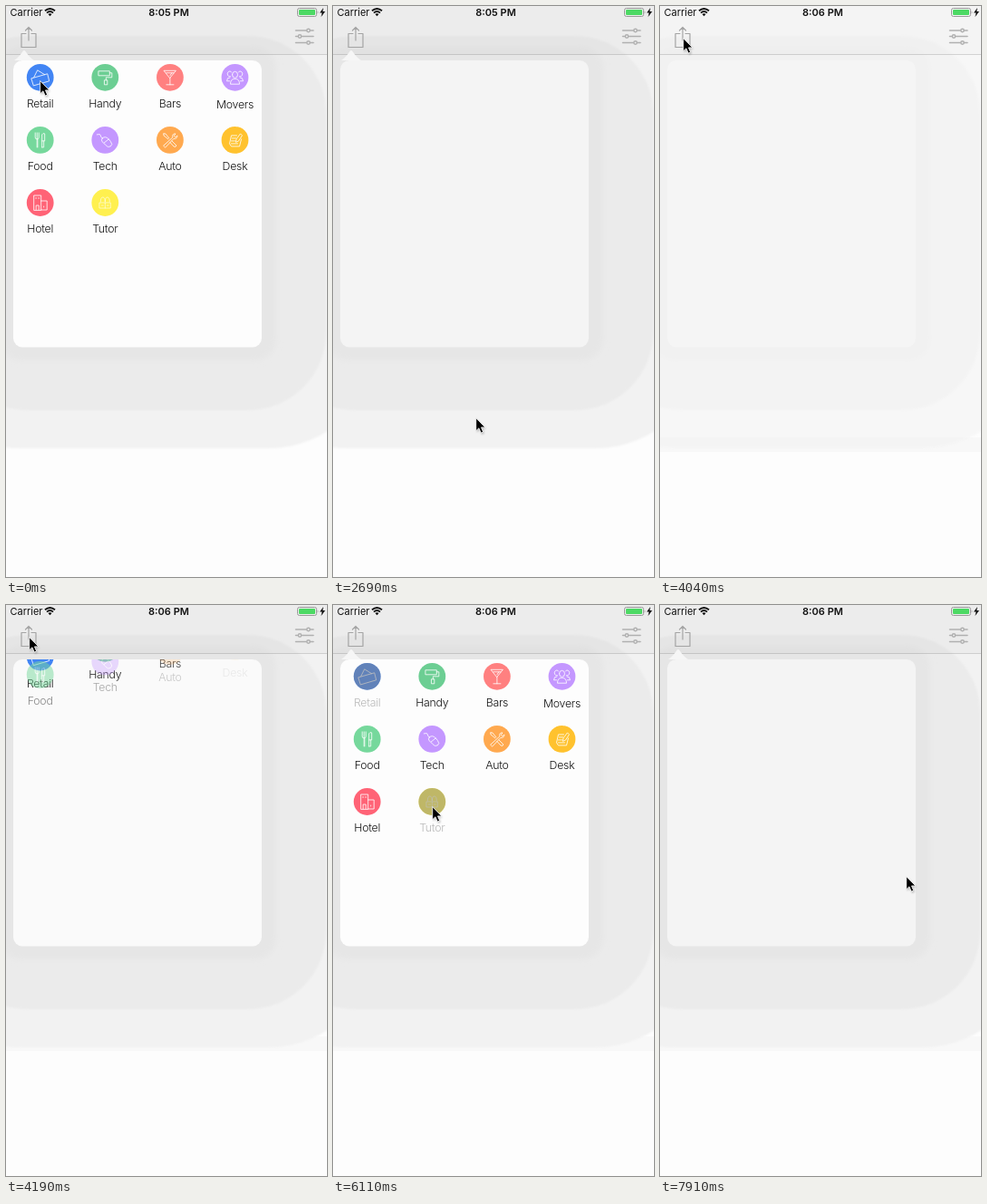
These frames come from a looping animation (354x630 px, 8000 ms). An HTML page:

```html
<!DOCTYPE html>
<html lang="en">
<head>
<meta charset="utf-8">
<title>Category popover</title>
<style>
  html, body { margin: 0; height: 100%; overflow: hidden; background: #fdfdfd; }
  svg { display: block; width: 100vw; height: 100vh; }
  .status { font: 11px Inter, sans-serif; fill: #111; }
  .label { font: 300 12.3px Inter, "Liberation Sans", sans-serif; letter-spacing: -.25px; text-anchor: middle; }
  .line { fill: none; stroke-linejoin: round; stroke-linecap: round; }
  #clock { font-weight: 600; text-anchor: middle; }
</style>
</head>
<body>
<svg viewBox="0 0 354 630">
  <defs>
    <clipPath id="inside"><rect x="8" y="60" width="274" height="316.500" rx="10"/></clipPath>
    <filter id="soft"><feGaussianBlur stdDeviation="1"/></filter>
    <filter id="softer"><feGaussianBlur stdDeviation="3"/></filter>
  </defs>
  <rect width="354" height="630" fill="#fdfdfd"/>
  <rect id="band" y="476" width="354" height="13" fill="#f8f8f8"/>

  <g id="shadow">
    <rect x="-104" y="-140" width="514" height="628" rx="120" fill="#f2f2f2" filter="url(#soft)"/>
    <rect x="-62" y="33" width="415" height="413" rx="86" fill="#ebebeb" filter="url(#soft)"/>
    <rect x="-8" y="44" width="306" height="347" rx="24" fill="#e6e6e6" filter="url(#softer)"/>
    <rect width="354" height="53" opacity=".025"/>
  </g>

  <path d="M0 53.500H354" stroke="#000" stroke-opacity=".15"/>
  <g class="line" stroke="#a4a4a4" stroke-width="1.200">
    <path d="M22 30.500H17V45.500H33V30.500H28M25 38V23.500M21.500 27L25 23.500L28.500 27"/>
    <g stroke="#b0b0b0" stroke-width="1.500">
      <path d="M319.500 27H339M319.500 33.500H339M319.500 40.500H339"/>
      <g fill="#f0f0f0"><circle cx="333.500" cy="27" r="1.700"/><circle cx="324" cy="33.500" r="1.700"/><circle cx="333.500" cy="40.500" r="1.700"/></g>
    </g>
  </g>
  <text class="status" x="4.500" y="11">Carrier</text>
  <text class="status" id="clock" x="179.500" y="11">8:05 PM</text>
  <g fill="none" stroke="#111" stroke-width="1.900">
    <path d="M43 5.300Q48.500 .500 54 5.300M45 7.600Q48.500 4.600 52 7.600"/>
    <path d="M46.500 9L48.500 11.200L50.500 9Q48.500 7.600 46.500 9Z" fill="#111" stroke="none"/>
  </g>
  <rect x="321.500" y="2.500" width="21" height="9" rx="2" fill="none" stroke="#999"/>
  <rect x="323" y="4" width="18" height="6" rx="1" fill="#4cd964"/>
  <path d="M343.700 5.500Q345.500 7 343.700 8.500Z" fill="#999"/>
  <path d="M350 2L346 7.500H348.500L347.500 12L352 6H349.300Z" fill="#111"/>

  <g id="popover">
    <path id="arrow" d="M9 60Q14 57 18.500 50Q20 48 21.500 50Q26 57 31 60Z" fill="#f6f6f6"/>
    <rect x="8" y="60" width="274" height="316.500" rx="10"/>
  </g>
  <g id="items" clip-path="url(#inside)"></g>
  <g id="cursor">
    <g transform="translate(.7 .5) scale(.92)">
      <path d="M1 2V17.500L4.500 14L7 20L10 18.500L7.500 13H12Z" opacity=".25" filter="url(#soft)"/>
      <path d="M0 0V15.500L3.500 12.300L6 18L8.600 16.900L6.300 11.300H11Z" stroke="#fff" stroke-width=".9"/>
    </g>
  </g>
</svg>
<script>
const LOOP = 8000;
const $ = id => document.getElementById(id);

// name, circle colour, line drawing around the circle's centre
const ITEMS = [
  ["Retail", "#4285f4", "M-9.500 1L8 -4L10 4L-7 9ZM-7 0L-3 -8L5 -3"],
  ["Handy", "#6cce93", "M-7 -7H5V-2H-7ZM5 -5H7.500V0H1V3M-.500 3H2.500V8H-.500Z"],
  ["Bars", "#ff8080", "M-6.500 -7.500H6.500L0 .500ZM0 .500V8M-4 8H4M-4 -5H4M0 -2L2 -5"],
  ["Movers", "#c497ff", "M-3 -3a3 3.500 0 1 0 6 0a3 3.500 0 1 0 -6 0M-5 7Q-5 1.500 0 1.500T5 7ZM-4 -6A2.500 3 0 1 0 -5 -1M4 -6A2.500 3 0 1 1 5 -1M-6 4H-9Q-9 0 -5.500 0M6 4H9Q9 0 5.500 0"],
  ["Food", "#76d89c", "M-5.500 -8V-3Q-5.500 -1 -3.500 -1T-1.500 -3V-8M-3.500 -8V8M-2.800 -1V8M2 8V-6Q3 -8 5 -7V1H2M4 1V8H2"],
  ["Tech", "#c497ff", "M-3 -2Q0 -5 4 -1L6 1.500Q9 5 6 7T0 5L-3 2Q-5 0 -3 -2ZM-1 3L4 -1M-3 -2Q-5 -3 -5 -5T-9 -6"],
  ["Auto", "#ffa94f", "M-7 -7L-5 -7L-1 -2M2 1L7 6L6 7.500L4 7L0 2.500M-7 6L3 -3Q2 -7 6 -7L4.500 -4.500L6 -3L8 -5Q8 -1 4 -1.500L-5 8ZM-7 -7V-5L-2 -1"],
  ["Desk", "#ffc22e", "M2 -5H-4L-6 4L-4 7H5L7 -1M-3 -2H1M-4 1H0M-4 4H3M1 2L1.500 -1L6 -7L8 -5L4 1Z"],
  ["Hotel", "#ff6376", "M-7 8V-8H1V8ZM1 -2H7.500V8H1M-5 -5H-4M-2 -5H-1M-4.500 8V3H-1.500V8M4 4V5"],
  ["Tutor", "#fff04f", "M-5 -1Q-5 -6 -2.500 -6T0 -1Q0 -6 2.500 -6T5 -1M-6 0H6V6H-6ZM0 0V6M-4 3H-2M2 3H4"]
];

const parts = ITEMS.map(([name, color, art], i) => {
  const x = 37.7 + (i % 4) * 71.6, y = 78.8 + Math.floor(i / 4) * 69.1;
  $("items").insertAdjacentHTML("beforeend",
    `<g><g transform="translate(${x} ${y})"><circle r="14.900" fill="${color}"/>
     <path class="line" d="${art}" stroke="#fff" stroke-width=".9" stroke-opacity="${name === "Tutor" ? .65 : .9}"/>
     <circle r="14.900" fill="#808080" opacity="0"/></g>
     <text class="label" x="${x}" y="${y + (name === "Movers" ? 34 : 33)}">${name}</text></g>`);
  const g = $("items").lastElementChild;
  return { g, veil: g.querySelectorAll("circle")[1], label: g.querySelector("text") };
});

// time, x, y of the pointer tip
const POINTER = [
  [0, 37, 82], [140, 50, 125], [290, 92, 245], [440, 108, 281],
  [890, 108, 281], [1040, 120, 330], [1190, 153, 420], [1340, 169, 452], [1490, 157, 456],
  [2690, 157, 454], [2840, 137, 290], [2990, 102, 120], [3140, 68, 72], [3290, 42, 48],
  [3590, 26, 36], [3740, 25, 35], [4340, 25, 35], [4640, 29, 77], [4940, 35, 81],
  [5390, 35, 81], [5540, 54, 120], [5840, 106, 215], [5960, 109, 222],
  [6410, 109, 222], [6860, 121, 296], [7310, 121, 296], [7760, 262, 299], [7910, 271, 299]
];

const clamp = v => Math.max(0, Math.min(1, v));

function pointerAt(t) {
  const k = POINTER.findIndex(p => p[0] > t);
  if (k < 0) return POINTER.at(-1).slice(1);
  const [a, b] = [POINTER[k - 1], POINTER[k]];
  const f = (t - a[0]) / (b[0] - a[0]);
  return [1, 2].map(j => a[j] + (b[j] - a[j]) * f);
}

// The picture advances in steps of about 150 ms.
function stepTime(t) {
  if (t < 150) return 0;
  const lead = t < 5960 ? 10 : 40;
  return Math.floor((t + lead) / 150) * 150 - lead;
}

function spring(s) {
  const k = .009, w = .007;
  return s <= 0 ? 1 : Math.exp(-k * s) * (Math.cos(w * s) + k / w * Math.sin(w * s));
}

function draw(now) {
  const t = stepTime(now % LOOP);
  const second = t >= 3740;
  const opening = t >= 4040 && t < 4340;
  const closing = t >= 7910 || (t >= 2690 && t < 3740);
  const shown = t < 2840 || t >= 4190 ? 1 : t < 2990 ? .4 : t < 4040 ? 0 : .5;

  $("clock").textContent = second ? "8:06 PM" : "8:05 PM";
  $("band").setAttribute("opacity", t >= 2840 ? 1 : 0);
  $("band").setAttribute("height", t >= 4040 ? 16 : 13);
  $("shadow").setAttribute("opacity", shown);
  $("popover").setAttribute("opacity", shown);
  $("popover").setAttribute("fill", closing ? "#f4f4f4" : opening ? "#fafafa" : "#fdfdfd");
  $("arrow").setAttribute("opacity", opening ? 0 : 1);
  $("items").setAttribute("visibility", closing || !shown ? "hidden" : "visible");

  parts.forEach(({ g, veil, label }, i) => {
    const s = second ? t - 3980 - 30 * i : 1e4;
    g.setAttribute("transform", `translate(0 ${-102 * spring(s)})`);
    g.setAttribute("opacity", clamp((s + 15) / 210));
    const pressed = i === 0 ? 5090 : i === 9 ? 5840 : LOOP;
    const dim = clamp((t - pressed + 100) / 200);
    veil.setAttribute("opacity", dim / 2);
    const ink = 20 + 165 * dim;
    label.setAttribute("fill", `rgb(${ink},${ink},${ink})`);
  });

  $("cursor").setAttribute("transform", `translate(${pointerAt(t)})`);
}

function frame() {
  draw(performance.now());
  requestAnimationFrame(frame);
}
frame();
</script>
</body>
</html>
```
